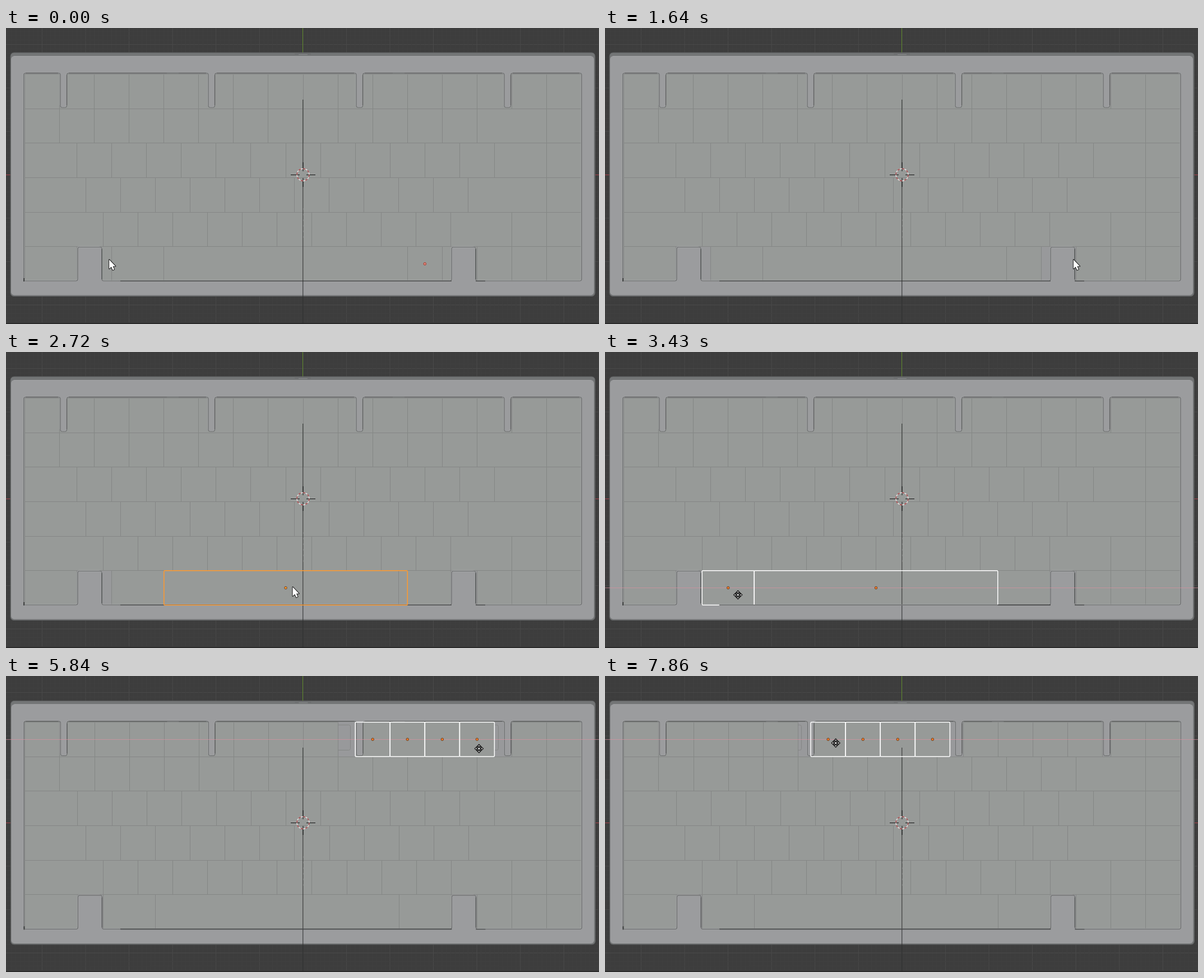
An HTML page with a canvas for the animation above (7990 ms loop, 1058 by 529 pixels).

```html
<!DOCTYPE html>
<html lang="en">
<head>
<meta charset="utf-8">
<title>Keyboard layout edit</title>
<style>
html, body { margin: 0; width: 100%; height: 100%; overflow: hidden; background: #3d3d3d; }
canvas { display: block; }
</style>
</head>
<body>
<canvas id="stage" width="1058" height="529"></canvas>
<script>
const ctx = document.getElementById('stage').getContext('2d');
const W = 1058, H = 529, LOOP = 7990;
const UNIT = 62.07, ROW = 61.65, LEFT = 33.5, TOP = 82.4;
const KEY = '#979a98', PLATE = '#98999b', SEAM = '#848685';
const ACTIVE = '#ff9a2e', SELECTED = '#f2581f';

const clamp = (v, lo, hi) => Math.max(lo, Math.min(hi, v));
const mix = (a, b, f) => a + (b - a) * f;
const snap = v => Math.floor(v) + 0.5;

// After a pause the picture advances in even steps.
const stepAt = t => t < 1200 ? 0 : Math.min(48, 1 + Math.floor((t - 1180) / 140));

// Key widths in units; a key's id is row * 20 + index.
const ones = n => Array(n).fill(1);
const ROWS = [
  ones(16),
  [...ones(13), 2, 1],
  [1.5, ...ones(12), 1.5, 1],
  [1.75, ...ones(11), 2.25, 1],
  [2.25, ...ones(10), 1.75, 1, 1],
  [1.5, 1, 1.5, 7, ...ones(5)]
];
const IDS = ROWS.flatMap((widths, r) => widths.map((_, i) => r * 20 + i));

// Each scene picks keys one by one from step `at`, then removes, links or moves them.
// `grip` is where the pointer rests, relative to the key's centre.
const SCENES = [
  { at: 1, gap: 2, keys: [101, 105], grip: [26, -8], until: 4, remove: true },
  { at: 5, gap: 2, keys: [104, 102], grip: [-27, -6], until: 12, menu: 8, link: 11 },
  { at: 12, gap: 1, keys: [103, 102], grip: [12, -2], until: 19, grab: 14, over: 3, by: -0.25 },
  { at: 20, gap: 1, keys: [13], grip: [-2, 2], until: 21, remove: true },
  { at: 22, gap: 1, keys: [9, 10, 11, 12], grip: [-2, 2], until: 40, grab: 27, over: 10.5, by: 0.75 },
  { at: 41, gap: 1, keys: [8, 7, 6, 5], grip: [8, -8], until: 50, grab: 45, over: 3, by: 0.375 }
];
const LINKER = SCENES.find(s => s.menu);
const STOPS = SCENES.flatMap(s => s.keys.map((id, i) => ({
  id, grip: s.grip, n: s.at + i * s.gap, leave: i === s.keys.length - 1 ? s.until : s.at + i * s.gap
})));

const menuOpen = n => n >= LINKER.menu && n < LINKER.link;
const hoverAt = n => n === LINKER.link - 1 ? 1 : 0;
const grabAt = n => SCENES.some(s => n >= s.grab && n < s.until - 1);
const isRemoved = (id, n) => SCENES.some(s => s.remove && n >= s.until && s.keys.includes(id));

function selectionAt(n) {
  const s = SCENES.find(s => n >= s.at && n < s.until);
  return s ? s.keys.slice(0, Math.floor((n - s.at) / s.gap) + 1) : [];
}

function place(id, n) {
  const row = Math.floor(id / 20), i = id % 20;
  let w = ROWS[row][i];
  let x = ROWS[row].slice(0, i).reduce((a, b) => a + b, 0);
  if (id === LINKER.keys[0] && n >= LINKER.link) {
    x -= 0.25;
    w += 0.5;
  }
  const move = SCENES.find(s => s.grab && s.keys.includes(id));
  if (move) x += move.by * clamp((n - move.grab) / move.over, 0, 1);
  return { x: LEFT + x * UNIT, y: TOP + row * ROW, w: w * UNIT, h: ROW };
}

const centre = k => [k.x + k.w / 2, k.y + k.h / 2];

function pointerAt(n) {
  const next = STOPS.find(s => s.n > n);
  const last = STOPS.filter(s => s.n <= n).pop() || next;
  const spot = s => centre(place(s.id, n)).map((v, i) => v + s.grip[i]);
  const from = spot(last);
  if (!next || n <= last.leave) return from;
  const f = clamp((n - last.leave) / (next.n - last.leave), 0, 1);
  return spot(next).map((v, i) => mix(from[i], v, f));
}

function line(x1, y1, x2, y2, color, width = 1) {
  ctx.strokeStyle = color;
  ctx.lineWidth = width;
  ctx.beginPath();
  ctx.moveTo(x1, y1);
  ctx.lineTo(x2, y2);
  ctx.stroke();
}

function box(x, y, w, h, r, fill, stroke, width = 1) {
  ctx.beginPath();
  ctx.roundRect(x, y, w, h, r);
  if (fill) { ctx.fillStyle = fill; ctx.fill(); }
  if (stroke) { ctx.strokeStyle = stroke; ctx.lineWidth = width; ctx.stroke(); }
}

function roundedPath(pts, r) {
  const path = new Path2D();
  path.moveTo(pts[0][0], pts[0][1] + r + 2);
  pts.forEach((p, i) => path.arcTo(...p, ...pts[(i + 1) % pts.length], r));
  path.closePath();
  return path;
}

const POSTS = [0, 1, 2, 3].map(i => 97 + 264 * i);
const BLOCKS = [795, 128];
const RECESS = roundedPath([
  [31.5, 80.5],
  ...POSTS.flatMap(x => [[x, 80.5], [x, 142], [x + 11.5, 142], [x + 11.5, 80.5]]),
  [1027, 80.5], [1027, 452],
  ...BLOCKS.flatMap(x => [[x + 43, 452], [x + 43, 391.5], [x, 391.5], [x, 452]]),
  [31.5, 452]
], 3.5);

function drawGrid() {
  ctx.fillStyle = '#3d3d3d';
  ctx.fillRect(0, 0, W, H);
  for (let k = -70; k <= 70; k++) {
    const color = k % 10 ? '#404040' : '#4a4a4a';
    const d = k * 7.757;
    line(529.8 + d, 0, 529.8 + d, H, color);
    line(0, 262.3 + d, W, 262.3 + d, color);
  }
  line(0, 262.5, W, 262.5, '#a8404a');
  line(529.5, 0, 529.5, 60, '#5f8a2c');
  ctx.fillStyle = '#2b2b2b';
  ctx.fillRect(0, 527, W, 2);
}

function drawKeys(n, nudge) {
  ctx.fillStyle = PLATE;
  ctx.fillRect(30, 79, 999, 375);
  for (const x of POSTS) box(x - 56.5, 87.5, 46, 45, 3, null, SEAM);
  for (const id of IDS) {
    if (isRemoved(id, n)) continue;
    const k = place(id, n);
    const x = snap(k.x + nudge), y = snap(k.y);
    box(x, y, snap(k.x + k.w + nudge) - x, snap(k.y + k.h) - y, 0, KEY, SEAM);
  }
}

const drawLip = () => line(204, 452.2, BLOCKS[0], 452.2, '#484a4a', 1.3);

function drawCase(n) {
  const nudge = n >= 28 ? 0.4 : 0;
  ctx.save();
  ctx.translate(nudge, nudge);
  box(8, 44, 1043, 435.5, 6, '#737576', '#5c5e5f');
  box(9, 50, 1040, 427.5, 6, '#9b9c9e');
  line(14, 50.5, 1044, 50.5, '#a3a4a6');
  line(515, 46.5, 544, 46.5, '#66686a');
  line(522, 47.5, 538, 47.5, '#8d8f90');

  ctx.save();
  ctx.clip(RECESS);
  ctx.translate(-nudge, -nudge);
  drawKeys(n, nudge);
  ctx.restore();

  ctx.save();
  ctx.translate(-1, -1);
  ctx.strokeStyle = '#a5a6a8';
  ctx.lineWidth = 1;
  ctx.stroke(RECESS);
  ctx.restore();
  ctx.strokeStyle = '#6d6f6f';
  ctx.lineWidth = 1.2;
  ctx.stroke(RECESS);

  // Edges in shade
  [20, ...POSTS].forEach((x, i, all) =>
    line(x + 15, 80.5, (all[i + 1] || 1027) - 4, 80.5, '#5c5e5e', 1.3));
  for (const x of POSTS) line(x + 11.5, 84, x + 11.5, 138, '#5c5e5e', 1.3);
  for (const x of BLOCKS) line(x + 43, 395, x + 43, 449, '#595b5b', 1.5);
  drawLip();
  line(838, 452.2, 855, 452.2, '#484a4a', 1.3);
  line(32, 447, 32, 453, '#404242', 2);
  for (const x of [287, 690]) line(x, 81.5, x + 21, 81.5, '#8a8c8c', 1.5);
  ctx.restore();
}

function drawCrosshair() {
  line(529.8, 128, 529.8, 251, '#2a2b2b');
  line(529.8, 273, 529.8, H, '#2a2b2b');
  ctx.setLineDash([3, 7]);
  line(530.5, 322, 530.5, 382, '#8b8d8c');
  ctx.setLineDash([]);
  for (const side of [-1, 1]) {
    line(530 + side * 6, 262.5, 530 + side * 22, 262.5, '#111');
    line(530, 262 + side * 6, 530, 262 + side * 22, '#111');
  }
  for (let i = 0; i < 16; i++) {
    ctx.beginPath();
    ctx.arc(530, 262.3, 11, i * Math.PI / 8, (i + 1) * Math.PI / 8);
    ctx.strokeStyle = i % 2 ? '#f0e6e6' : '#b5474b';
    ctx.lineWidth = 1.3;
    ctx.stroke();
  }
}

function dot([x, y], fill, rim = '#5e3a20') {
  box(x - 2.3, y - 2.3, 4.6, 4.6, 2.3, fill, rim, 0.9);
}

function drawSelection(n) {
  const ids = selectionAt(n), grab = grabAt(n);
  const boxes = ids.map(id => place(id, n));
  const color = i => i === ids.length - 1 && !menuOpen(n) ? ACTIVE : SELECTED;
  if (grab) {
    const y = snap(centre(boxes[0])[1]);
    line(0, y, W, y, 'rgba(222,145,160,.65)');
  }
  boxes.forEach((k, i) => box(k.x, k.y, k.w, k.h, 1.5, null, grab ? '#fff' : color(i), 1.5));
  if (grab) drawLip();
  boxes.forEach((k, i) => dot(centre(k), grab ? '#f07a28' : color(i)));
  if (n === 0) dot(centre(place(LINKER.keys[0], n)), '#d9877c', '#a62f22');
}

// Label and its underlined character
const ITEMS = [
  ['Link Objects to Scene', 0], ['Link Object Data', 5], ['Link Materials', 5],
  ['Link Animation Data', 6], ['Link Collections', 5]
];

function drawMenu(hover) {
  box(40, 370, 209, 180, 4, '#181818', '#222');
  ctx.font = '12px "Open Sans", "Noto Sans", sans-serif';
  ctx.fillStyle = '#9c9c9c';
  ctx.fillText('Link/Transfer Data', 49.5, 389.5);
  line(44, 401.5, 245, 401.5, '#242424');
  line(44, 433.5, 245, 433.5, '#303030');
  ITEMS.forEach(([label, at], i) => {
    const y = i ? 425.2 + 23.8 * i : 417;
    if (i === hover) box(44, y - 10, 200.5, 21, 4, '#4772b3');
    ctx.fillStyle = i === hover ? '#fff' : '#e3e3e3';
    ctx.fillText(label, 77, y + 4.5);
    const x = 77 + ctx.measureText(label.slice(0, at)).width;
    ctx.fillRect(x, Math.round(y + 7), ctx.measureText(label[at]).width, 1);
  });
  ctx.fillStyle = '#a9bcdd';
  ctx.fill(new Path2D('M233.5 414 240.5 417.5 233.5 421Z'));
}

const ARROW = new Path2D('M0 0V16.2L3.8 12.8 6.3 18.6 9 17.4 6.5 11.8H11.2Z');
const HEAD = new Path2D('M0-7.5 3.5-3.8H-3.5Z');

function drawPointer(n) {
  const [x, y] = pointerAt(n);
  ctx.save();
  ctx.translate(x + 0.5, y + 0.5 + 32 * hoverAt(n));
  ctx.lineJoin = 'round';
  ctx.strokeStyle = '#1c1c1c';
  ctx.fillStyle = '#fff';
  if (grabAt(n)) {
    ctx.translate(5, 14);
    box(-2, -2, 4, 4, 1, '#fff', '#1c1c1c', 1.4);
    for (let i = 0; i < 4; i++) {
      ctx.lineWidth = 1.5;
      ctx.fill(HEAD);
      ctx.stroke(HEAD);
      ctx.rotate(Math.PI / 2);
    }
  } else {
    ctx.lineWidth = 2;
    ctx.stroke(ARROW);
    ctx.fill(ARROW);
  }
  ctx.restore();
}

function draw(t) {
  const n = stepAt(t);
  drawGrid();
  drawCase(n);
  drawCrosshair();
  drawSelection(n);
  if (menuOpen(n)) drawMenu(hoverAt(n));
  drawPointer(n);
}

const start = performance.now();
function tick() {
  draw((performance.now() - start) % LOOP);
  requestAnimationFrame(tick);
}
tick();
</script>
</body>
</html>
```
